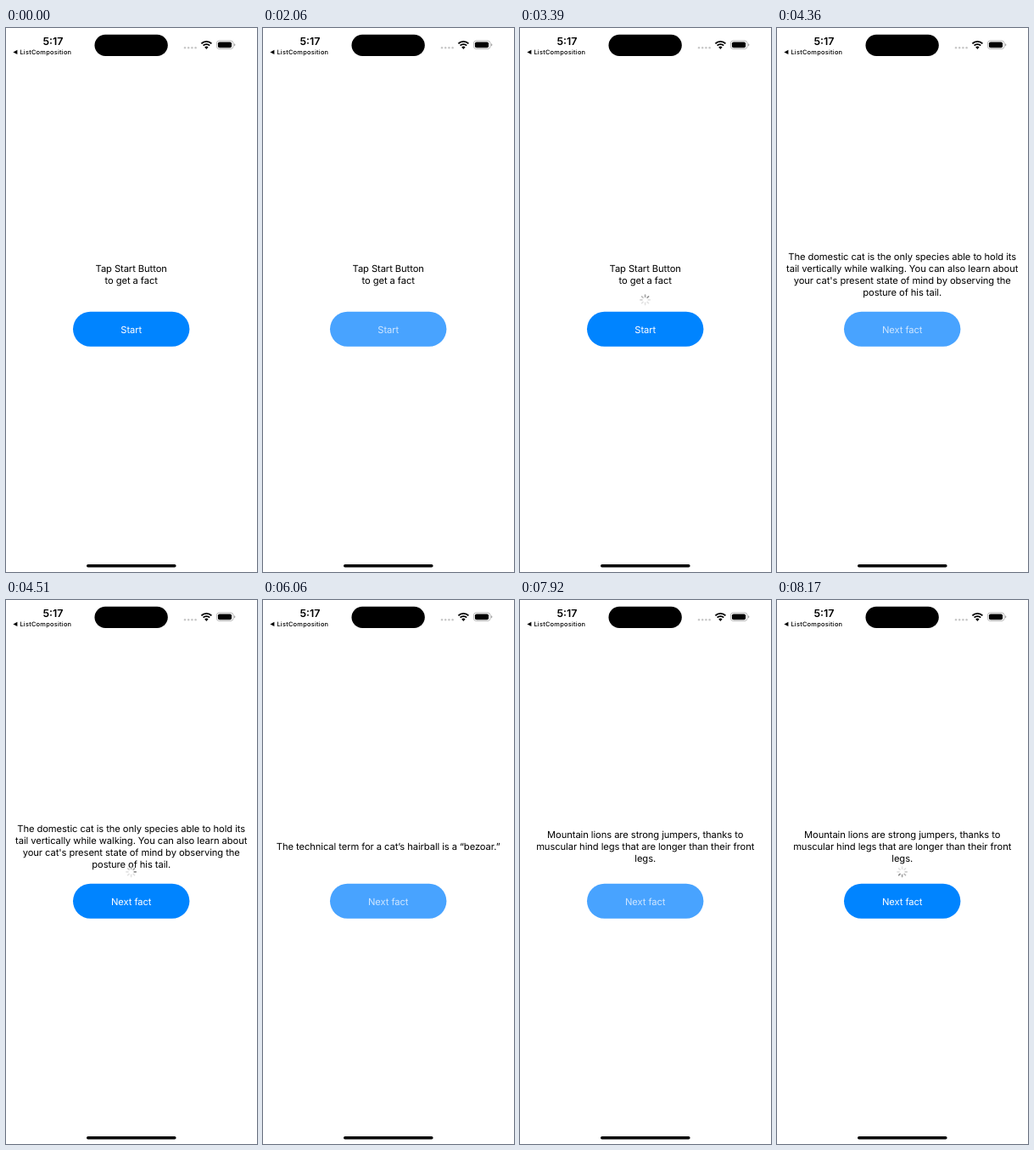
Recreate the animation shown at these times as an HTML page. Size 296x640 px, loop 8250 ms.

```html
<!DOCTYPE html>
<html lang="en">
<head>
<meta charset="utf-8">
<title>Cat facts</title>
<style>
  html, body { margin: 0; width: 100%; height: 100%; overflow: hidden; background: #fff; }
  svg { display: block; width: 100%; height: 100%; }
  text { font-family: Inter, "Open Sans", sans-serif; text-rendering: geometricPrecision; }
  .body { font-size: 11.2px; letter-spacing: -0.08px; text-anchor: middle; }
  .time { font-size: 12.4px; font-weight: 600; text-anchor: middle; }
  .back { font-size: 7.4px; font-weight: 500; letter-spacing: 0.25px; }
</style>
</head>
<body>
<svg viewBox="0 0 296 640">
  <text class="time" x="55.5" y="19.6">5:17</text>
  <path d="M8.4 28.4L13.4 25.8V31z"/>
  <text class="back" x="16.4" y="31">ListComposition</text>
  <rect x="104.5" y="7.7" width="86.3" height="25.3" rx="12.65"/>

  <g fill="#c6c6c6">
    <circle cx="211" cy="23.3" r="1.2"/>
    <circle cx="215.2" cy="23.3" r="1.2"/>
    <circle cx="219.4" cy="23.3" r="1.2"/>
    <circle cx="223.6" cy="23.3" r="1.2"/>
  </g>
  <g fill="none" stroke="#000" stroke-width="1.9">
    <path d="M230.4 18.4A8.4 8.4 0 0 1 242.4 18.4"/>
    <path d="M232.6 20.7A5.3 5.3 0 0 1 240.2 20.7"/>
  </g>
  <path d="M236.4 24.9L234.2 22.6A3.1 3.1 0 0 1 238.6 22.6z"/>
  <rect x="248.4" y="15" width="19.6" height="9.6" rx="3" fill="none" stroke="#a6a6a6" stroke-width="0.8"/>
  <rect x="249.9" y="16.4" width="16.2" height="6.8" rx="1.9"/>
  <path d="M269 18.2Q270.4 18.6 270.4 19.8T269 21.4z" fill="#a6a6a6"/>

  <g id="fact" class="body"></g>
  <g id="spinner" transform="translate(147.6 319.8)" stroke-width="1.7" stroke-linecap="round"></g>
  <rect id="button" x="79" y="333.7" width="137.4" height="41.1" rx="20.55"/>
  <text id="label" class="body" x="147.7" y="358.6"></text>
  <rect x="95" y="631" width="105.6" height="3.4" rx="1.7"/>
</svg>
<script>
const LOOP = 8250;
const NS = "http://www.w3.org/2000/svg";
const $ = id => document.getElementById(id);

const facts = [
  { at: 0, lines: ["Tap Start Button", "to get a fact"] },
  { at: 4360, lines: [
    "The domestic cat is the only species able to hold its",
    "tail vertically while walking. You can also learn about",
    "your cat's present state of mind by observing the",
    "posture of his tail."] },
  { at: 6060, lines: ["The technical term for a cat’s hairball is a “bezoar.”"] },
  { at: 6350, lines: [
    "Mountain lions are strong jumpers, thanks to",
    "muscular hind legs that are longer than their front",
    "legs."] }
];
const presses = [[2060, 2170], [4360, 4510], [6060, 6210], [7920, 8070]];
// Each run starts with the given spoke leading; "hold" is when it stalls.
const spins = [
  { from: 2170, to: 4360, head: -8.5, hold: 3390 },
  { from: 4510, to: 6060, head: 2, hold: 4510 },
  { from: 6210, to: 6350, head: 0, hold: 6210 },
  { from: 8070, to: LOOP, head: 4.2, hold: 8170 }
];
const TICK = 108, SPOKE_TIME = 125;

function add(parent, tag, attrs) {
  const el = document.createElementNS(NS, tag);
  for (const key in attrs) el.setAttribute(key, attrs[key]);
  return parent.appendChild(el);
}

const spokes = Array.from({ length: 8 }, (_, i) =>
  add($("spinner"), "line", { y1: -3.6, y2: -5.6, transform: `rotate(${i * 45})` }));

let shown;
function showFact(fact) {
  if (fact === shown) return;
  shown = fact;
  $("fact").replaceChildren();
  const top = 293.7 - 7 * (fact.lines.length - 1);
  fact.lines.forEach((line, i) => {
    add($("fact"), "text", { x: 147.7, y: top + 14 * i }).textContent = line;
  });
}

function showSpinner(t) {
  const run = spins.find(s => t >= s.from && t < s.to);
  $("spinner").style.display = run ? "" : "none";
  if (!run) return;
  const span = run.hold - run.from;
  const elapsed = t >= run.hold ? span : Math.floor((t - run.from + 5) / TICK) * TICK;
  const head = run.head + elapsed / SPOKE_TIME;
  spokes.forEach((spoke, i) => {
    const age = (((head - i) % 8) + 8) % 8;
    const grey = Math.round(Math.min(226, 142 + 21 * age));
    spoke.setAttribute("stroke", `rgb(${grey},${grey},${grey})`);
  });
}

function render(t) {
  const pressed = presses.some(([from, to]) => t >= from && t < to);
  showFact(facts.findLast(f => t >= f.at));
  showSpinner(t);
  $("button").setAttribute("fill", pressed ? "#48a3ff" : "#0084ff");
  $("label").setAttribute("fill", pressed ? "#cfe6ff" : "#fff");
  $("label").textContent = t < 4360 ? "Start" : "Next fact";
}

const start = performance.now();
function frame() {
  render((performance.now() - start) % LOOP);
  requestAnimationFrame(frame);
}
frame();
</script>
</body>
</html>
```
